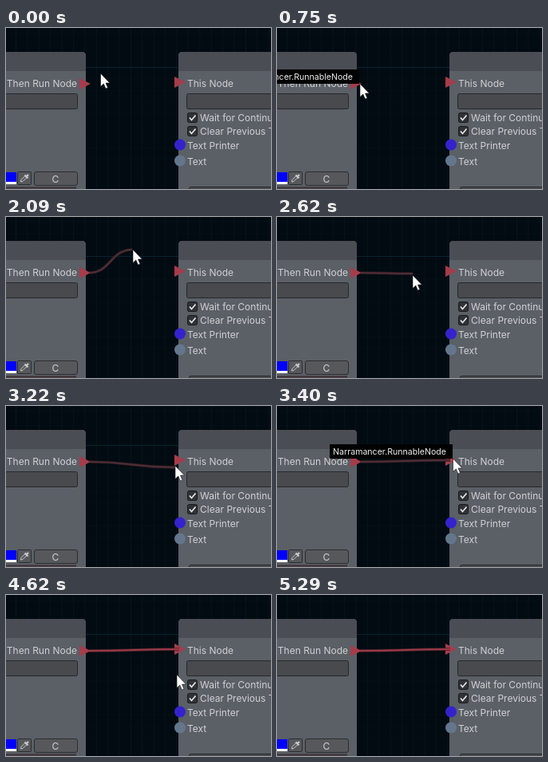
These frames come from a looping animation (332 px wide and 202 px high, 6030 ms). An HTML page:

```html
<!DOCTYPE html>
<html lang="en">
<head>
<meta charset="utf-8">
<title>Connecting nodes</title>
<style>
  html, body { margin: 0; width: 100%; height: 100%; overflow: hidden; background: #020b11; }
  svg { display: block; width: 332px; height: 202px; }
  text { font: 12px Inter, "Open Sans", sans-serif; fill: #d0d1d3; }
  #tip text { font-size: 10.6px; fill: #eee; }
  .node { fill: #5b5f66; }
  .head { fill: #4a4d53; }
  .field { fill: #484a4d; stroke: #25282b; }
  .button { fill: #56585b; stroke: #2b2d30; }
  .port { fill: #a53c4b; }
</style>
</head>
<body>
<svg viewBox="0 0 332 202">
  <rect width="332" height="202" fill="#020b11"/>
  <g id="grid" stroke="#0b1d27" stroke-opacity=".55"></g>
  <path d="M0 49.5H332" stroke="#0a2231"/>

  <path class="node" d="M-9 202V30H95Q100 30 100 35V202Z"/>
  <path class="head" d="M-9 54V30H95Q100 30 100 35V54Z"/>
  <path class="node" d="M341 202V30H221Q216 30 216 35V202Z"/>
  <path class="head" d="M341 54V30H221Q216 30 216 35V54Z"/>

  <text x="89" y="74" text-anchor="end">Then Run Node</text>
  <rect class="field" x="-5.5" y="82.5" width="95" height="19" rx="2"/>
  <path d="M0 181H13V193H0Z" fill="#00f"/>
  <path d="M0 193H13V196H0Z" fill="#fff"/>
  <rect class="button" x="14.5" y="180.5" width="17" height="16" rx="1"/>
  <path d="M18.500 193L19 190.500L24 185.500L26 187.500L21 192.500Z" fill="none" stroke="#c8cacc"/>
  <path d="M23.500 184.500L27.500 188.500M25.500 186.500L28 184" stroke="#c8cacc" stroke-width="2.200"/>
  <rect class="button" x="35.500" y="180.500" width="54" height="17" rx="2.500"/>
  <text x="62" y="193.500" text-anchor="middle">C</text>
  <path d="M0 200.500H88" stroke="#3c2e33" stroke-width="2"/>

  <text x="227" y="74">This Node</text>
  <rect class="field" x="226.500" y="82.500" width="120" height="19" rx="2"/>
  <g id="checks"></g>
  <text x="243" y="117">Wait for Continue</text>
  <text x="243" y="134">Clear Previous Text</text>
  <circle cx="218" cy="146.500" r="7" fill="#3423cd"/>
  <circle cx="218" cy="166.500" r="7" fill="#63768c"/>
  <text x="227" y="152">Text Printer</text>
  <text x="227" y="172">Text</text>
  <rect id="slot" class="field" x="229.500" y="199.500" width="120" height="18" rx="2"/>

  <path class="port" d="M92 63L106 70L92 77Z"/>
  <path class="port" d="M211 61L225 68L211 75Z"/>
  <path id="rim" fill="none" stroke-width="3.600"/>
  <path id="wire" fill="none" stroke-width="2"/>
  <g id="tip">
    <rect x="-154" width="154" height="18" fill="#020202"/>
    <text x="-8" y="13" text-anchor="end">Narramancer.RunnableNode</text>
  </g>
  <path id="arrow" d="M0 0V16.500L3.800 13L6.400 19L9 17.900L6.500 12H11.500Z" fill="#fff" stroke="#111" stroke-width=".6"/>
  <circle id="busy" r="8.500" fill="none" stroke="#35a5dc" stroke-width="3.500"/>
</svg>
<script>
const LOOP = 6030, STEP = 60;
const $ = id => document.getElementById(id);

// Each move: start time, then one cursor position per step.
const moves = [
  [0, [118.5, 57]],
  [260, [118.5, 59], [118, 61]],
  [630, [115, 64], [109, 68], [104, 70], [102, 71]],
  [1370, [107, 71]],
  [1610, [108, 70], [112, 68], [119, 63], [128, 57], [138, 50], [147, 45], [154, 42], [158, 41], [159, 41]],
  [2400, [161, 46], [166, 58], [170, 71]],
  [2620, [170, 73], [174, 75], [180, 77], [187, 78], [193, 78], [196, 78], [197, 78]],
  [3040, [200, 78], [206, 78], [212, 77], [212, 75], [215, 69], [218, 67], [220.5, 66]],
  [4560, [212, 72], [214, 100], [217, 135], [220, 175], [221, 210]]
];

const within = (t, a, b) => t >= a && t < b;
const show = (el, on) => el.setAttribute("visibility", on ? "visible" : "hidden");
const place = (el, x, y) => el.setAttribute("transform", `translate(${x} ${y})`);

function cursorAt(t) {
  const [start, ...pts] = moves.findLast(m => m[0] <= t);
  return pts[Math.min(Math.floor((t - start) / STEP), pts.length - 1)];
}

function drawWire(t) {
  const on = within(t, 1610, LOOP);
  show($("wire"), on);
  show($("rim"), on);
  if (!on) return;
  const [x, y] = t >= 3280 ? [217, 68] : cursorAt(t - STEP);
  const mid = (104 + x) / 2;
  const [core, rim] = t < 4230 ? ["#512d34", "#2b1d24"]
    : t < 4560 ? ["#c6c6c8", "#57595d"] : ["#9d3948", "#4b222b"];
  for (const [id, color] of [["rim", rim], ["wire", core]]) {
    $(id).setAttribute("d", `M104 70C${mid} 70 ${mid} ${y} ${x} ${y}`);
    $(id).setAttribute("stroke", color);
  }
}

function drawTip(t, [x, y]) {
  show($("tip"), within(t, 690, 1430) || within(t, 3280, 4620));
  if (within(t, 1370, 1430)) [x, y] = cursorAt(t - STEP);
  place($("tip"), Math.round(x - 0.6), y - 18);
}

function render(t) {
  const pos = cursorAt(t), busy = within(t, 3770, 4230);
  drawWire(t);
  drawTip(t, pos);
  place($("arrow"), ...pos);
  place($("busy"), ...pos);
  show($("arrow"), !busy && t < 4800);
  show($("busy"), busy);
  $("slot").style.stroke = within(t, 4980, 5290) ? "#6d7074" : "";
}

let lines = "";
for (let x = 12.5; x < 332; x += 14.4) lines += `<path d="M${x} 0V202"/>`;
for (let y = 6.5; y < 202; y += 14.4) lines += `<path d="M0 ${y}H332" opacity=".4"/>`;
$("grid").innerHTML = lines;
$("checks").innerHTML = [106, 123].map(y => `<g transform="translate(227 ${y})">
  <rect x=".5" y=".5" width="12" height="12" rx="2" fill="#303235" stroke="#191b1d"/>
  <path d="M3 6.500L5.500 9.500L10.500 3.500" fill="none" stroke="#e4e5e6" stroke-width="1.700"/></g>`).join("");

const begin = performance.now();
function tick() {
  render((performance.now() - begin) % LOOP);
  requestAnimationFrame(tick);
}
tick();
</script>
</body>
</html>
```
